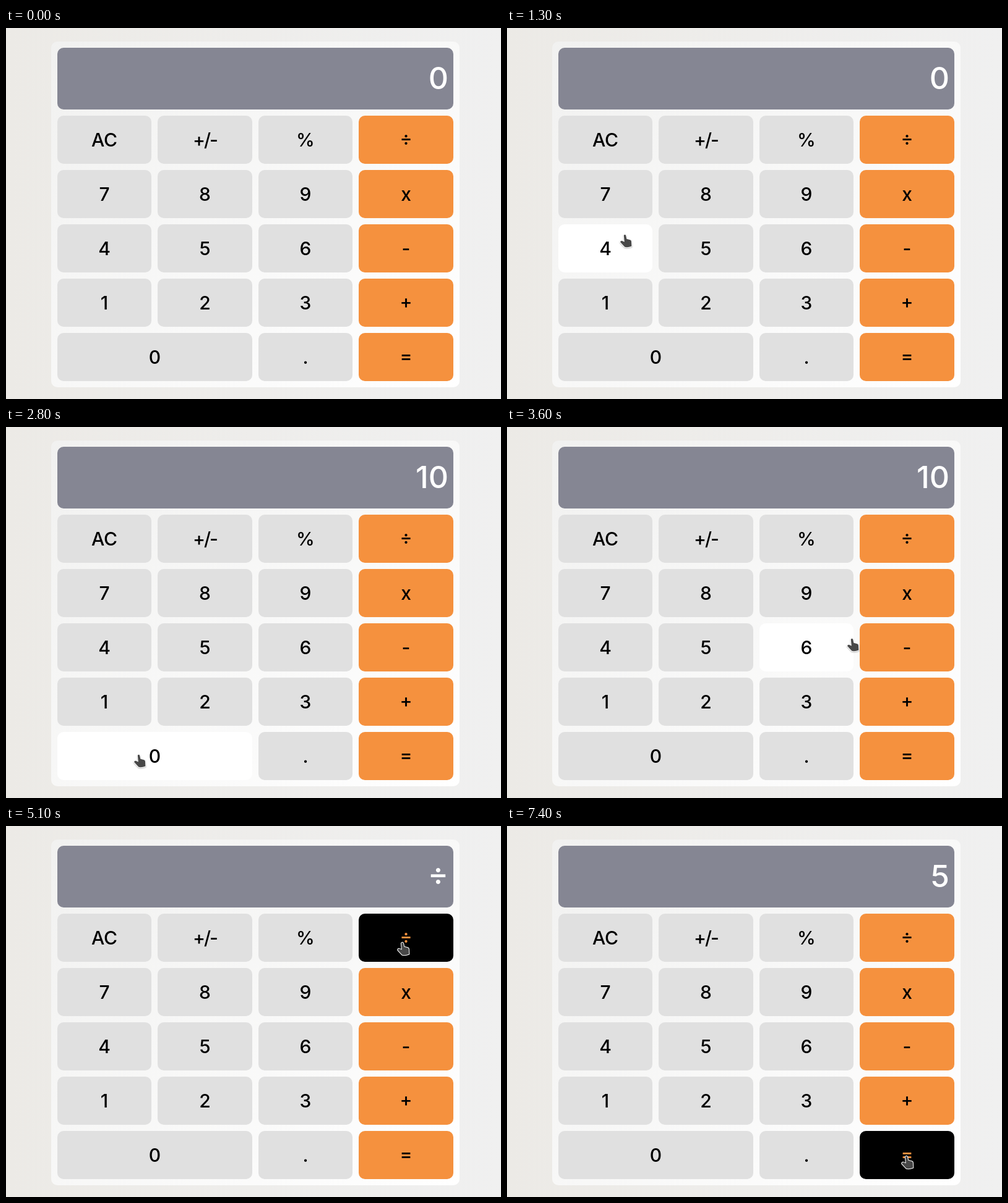
An HTML page with a canvas that plays this animation: 800 px wide and 601 px high, repeating every 8000 ms.

```html
<!DOCTYPE html>
<html lang="en">
<head>
<meta charset="utf-8">
<title>Calculator</title>
<style>
  html, body { margin: 0; width: 100%; height: 100%; overflow: hidden; background: #eeeeec; }
  canvas { display: block; }
</style>
</head>
<body>
<canvas id="stage" width="800" height="601"></canvas>
<script>
const ctx = document.getElementById('stage').getContext('2d');
const LOOP = 8000, STEP = 100;
const ORANGE = '#f5913e';

const rows = ['AC +/- % ÷', '7 8 9 x', '4 5 6 -', '1 2 3 +', '0 . ='];
const keys = rows.flatMap((row, r) => {
  let col = 0;
  return row.split(' ').map(label => {
    const x = Math.floor(83 + 162.5 * col);
    col += label === '0' ? 2 : 1;
    const right = Math.floor(73 + 162.5 * col);
    return { label, x, y: 142 + 88 * r, w: right - x, h: 78, operator: col === 4 };
  });
});

// Each move: start time, duration, end x, end y. The pointer rests in between.
const moves = [
  [400, 0, 450, 590], [400, 500, 344, 303], [900, 300, 195, 290], [1200, 300, 184, 422],
  [1900, 100, 189, 437], [2000, 400, 215, 530], [3000, 600, 558, 342], [3600, 300, 640, 307],
  [3900, 600, 641, 188], [5100, 800, 321, 405], [5900, 200, 318, 430], [6500, 600, 646, 534]
];
const readings = [[0, '0'], [2000, '1'], [2800, '10'], [5100, '÷'], [6400, '2'], [7400, '5']];

const hand = new Path2D('M6.8 2Q8.4 -.4 10 1.8L11.4 7.8L17 9.2Q19 9.8 19 12L19.4 19.6Q13 22 8.4 20.8L1.2 13Q1 10.6 3.6 10.8L7.8 12.6Z');
const arrow = new Path2D('M0 0L0 16L4 13.5L7 18.5L10 17L8 12L11 11.5Z');

function gradient(x0, y0, x1, y1, from, to) {
  const g = ctx.createLinearGradient(x0, y0, x1, y1);
  g.addColorStop(0, from);
  g.addColorStop(1, to);
  return g;
}

function box(x, y, w, h, fill) {
  ctx.fillStyle = fill;
  ctx.beginPath();
  ctx.roundRect(x, y, w, h, 10);
  ctx.fill();
}

// Letters share a baseline around the middle y; maths signs centre on it.
function write(text, x, y, size, color, align) {
  ctx.font = `500 ${size}px Inter, "Open Sans", sans-serif`;
  ctx.textAlign = align;
  ctx.fillStyle = color;
  ctx.letterSpacing = text === '+/-' ? '-2px' : '0px';
  const m = ctx.measureText(text);
  const drop = '÷+='.includes(text)
    ? (m.actualBoundingBoxAscent - m.actualBoundingBoxDescent) / 2
    : size * 0.364;
  ctx.fillText(text, x, y + drop);
}

function pointerAt(t) {
  let p = null;
  for (const [start, length, x, y] of moves) {
    if (t < start) break;
    const k = length ? Math.min(1, (t - start) / length) : 1;
    p = p ? [p[0] + (x - p[0]) * k, p[1] + (y - p[1]) * k] : [x, y];
  }
  return p;
}

function isOver({ x, y, w, h }, p) {
  return p && p[0] >= x && p[0] < x + w && p[1] >= y && p[1] < y + h - 6;
}

function drawKey({ label, x, y, w, h, operator }, hot) {
  const fill = operator ? (hot ? '#000' : ORANGE) : (hot ? '#fff' : '#e0e0e0');
  box(x, y, w, h, fill);
  write(label, x + w / 2, y + h / 2 + 0.2, 30, operator && hot ? ORANGE : '#000', 'center');
}

function drawPointer([x, y], isHand) {
  const shape = isHand ? hand : arrow;
  ctx.save();
  ctx.translate(Math.round(x) - (isHand ? 9 : 0), Math.round(y));
  ctx.lineJoin = 'round';
  ctx.lineWidth = 2;
  ctx.strokeStyle = '#fff';
  ctx.shadowColor = 'rgba(0,0,0,.3)';
  ctx.shadowBlur = 2;
  ctx.shadowOffsetY = 1;
  ctx.stroke(shape);
  ctx.shadowColor = 'transparent';
  ctx.fillStyle = '#484848';
  ctx.fill(shape);
  ctx.restore();
}

function draw(t) {
  ctx.fillStyle = gradient(0, 0, 800, 0, '#eceae6', '#f0f0f0');
  ctx.fillRect(0, 0, 800, 601);
  box(73, 22, 660, 560, gradient(98, -3, 708, 607, '#f1f1f0', '#ffffff'));
  box(83, 32, 640, 100, '#858693');

  const reading = readings.filter(r => r[0] <= t).pop()[1];
  write(reading, 715, 81, 50, '#fff', 'right');

  const p = pointerAt(t);
  const hot = keys.find(key => isOver(key, p));
  for (const key of keys) drawKey(key, key === hot);
  if (p) drawPointer(p, hot || t > 900);
}

const start = performance.now();
function tick() {
  const t = (performance.now() - start) % LOOP;
  draw(Math.floor(t / STEP) * STEP);
  requestAnimationFrame(tick);
}
tick();
</script>
</body>
</html>
```
